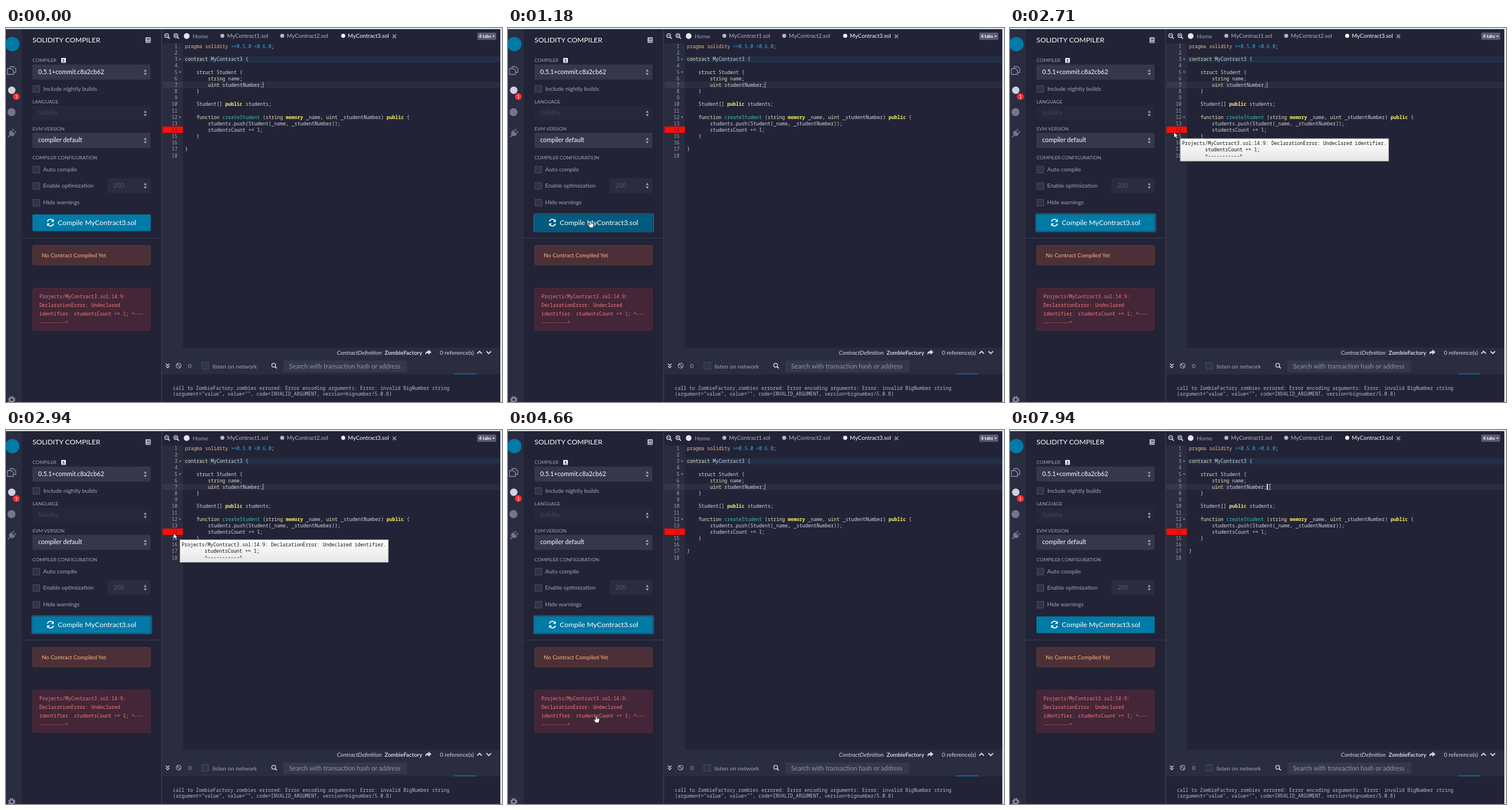
Recreate the animation shown at these times as an HTML page. Size 862x649 px, loop 8 s.

```html
<!DOCTYPE html>
<html lang="en">
<head>
<meta charset="utf-8">
<title>Solidity compiler</title>
<style>
html, body { margin: 0; width: 100%; height: 100%; overflow: hidden; background: #222336; }
svg { display: block; width: 100%; height: 100%; }
text { font-family: Lato, sans-serif; white-space: pre; }
.m { font-family: "Noto Sans Mono", "DejaVu Sans Mono", monospace; }
</style>
</head>
<body>
<svg id="stage" viewBox="0 0 862 649" xmlns="http://www.w3.org/2000/svg"></svg>
<script>
const LOOP = 8000, STEP = 78, LINE = 11.15, MONO = 8.35;
const DIM = '#a2a3b8', PALE = '#d5d6e2', WHITE = '#ffffff', FIELD = '#35384c', PANEL = '#2a2c3f', BLUE = '#007aa6';
const parts = [];
const add = s => parts.push(s);
const esc = s => s.replace(/&/g, '&amp;').replace(/</g, '&lt;');
const rect = (x, y, w, h, fill, extra = '') =>
  add(`<rect x="${x}" y="${y}" width="${w}" height="${h}" fill="${fill}" ${extra}/>`);
const disc = (x, y, r, fill) => add(`<circle cx="${x}" cy="${y}" r="${r}" fill="${fill}"/>`);
const fillPath = (d, fill, extra = '') => add(`<path d="${d}" fill="${fill}" ${extra}/>`);
const line = (d, color, w = 1.2, extra = '') =>
  add(`<path d="${d}" fill="none" stroke="${color}" stroke-width="${w}" ${extra}/>`);
const text = (x, y, s, size, fill, extra = '') =>
  add(`<text x="${x}" y="${y}" font-size="${size}" fill="${fill}" ${extra}>${esc(s)}</text>`);
const mono = (x, y, s, fill, extra = '') => text(x, y, s, MONO, fill, 'class="m" ' + extra);

function select(y, label, color, fill, x = 46) {
  rect(x, y, 251 - x, 26, fill, 'rx="1"');
  text(x + 10, y + 16, label, 10.75, color);
  fillPath(`M239.500 ${y + 12}l2.500 -4 2.500 4zM239.500 ${y + 14.500}l2.500 4 2.500 -4z`, DIM);
}
function check(x, y, label, gap = 18) {
  rect(x, y, 11.500, 11.500, '#303347', 'stroke="#4b4e64" stroke-width="1"');
  text(x + gap, y + 8.500, label, 10.1, DIM);
}
function lens(x, y, sign, color = PALE) {
  add(`<circle cx="${x - 0.8}" cy="${y - 0.8}" r="3.3" fill="none" stroke="${color}" stroke-width="1.4"/>`);
  line(`M${x + 1.6} ${y + 1.6}l3 3`, color, 1.8);
  if (sign) line(`M${x - 2.600} ${y - 0.8}h3.600` + (sign === '+' ? 'm-1.800 -1.800v3.600' : ''), color, 1);
}

function drawRail() {
  rect(0, 0, 28, 649, PANEL);
  line('M28.500 2V649', '#202132');
  disc(11, 28, 12.500, BLUE);
  line('M7 70v-3h6l4 4v6h-4M2.500 70.500h7l3.500 3.500v6.500h-10.500z', '#8a8da5', 1.3);
  disc(10, 108, 6.500, '#d0d1dc');
  disc(18, 119, 6, '#f12f2f');
  text(18, 122, '1', 8, WHITE, 'text-anchor="middle"');
  disc(9.500, 146, 7, '#72758d');
  add('<g transform="translate(10 183) rotate(45)">');
  fillPath('M-5 -3h10v2c0 4-2 5-4 5v5h-2v-5c-2 0-4-1-4-5zM-3.500 -8h2v4h-2zM1.500 -8h2v4h-2z', '#72758d');
  add('</g>');
  add('<circle cx="10" cy="645" r="5.400" fill="none" stroke="#8a8da5" stroke-width="2.200" stroke-dasharray="2.240 2"/>');
  add('<circle cx="10" cy="645" r="3.400" fill="none" stroke="#8a8da5" stroke-width="2.400"/>');
}

function drawPanel() {
  text(46, 25.200, 'SOLIDITY COMPILER', 12.3, WHITE);
  rect(242.500, 16, 9, 10, '#b9bacb', 'rx="1.200"');
  line('M245 18.500h5M245 20.500h5M244 24h7', '#222336', 0.9);
  text(46, 59.300, 'COMPILER', 8.4, DIM);
  rect(96, 52, 8, 8.500, WHITE, 'rx="1"');
  line('M100 53.500v4M98 55.500h4M97.500 58.800h5', '#222336', 1);
  select(63.500, '0.5.1+commit.c8a2cb62', WHITE, FIELD);
  check(47, 100, 'Include nightly builds');
  text(46, 130.700, 'LANGUAGE', 8.4, DIM);
  select(135, 'Solidity', '#424559', '#262839');
  text(46, 178, 'EVM VERSION', 8.4, DIM);
  select(182, 'compiler default', WHITE, FIELD);
  text(46, 228, 'COMPILER CONFIGURATION', 8.4, DIM);
  check(47, 240, 'Auto compile', 17.500);
  check(47, 268.500, 'Enable optimization', 17.500);
  select(260.500, '200', '#55586c', PANEL, 176.500);
  check(47, 297.500, 'Hide warnings', 17.500);

  rect(45, 322.500, 208, 31, 'none', 'id="ring" rx="2" stroke="#245975" stroke-width="2"');
  rect(46, 323.500, 205.500, 29, BLUE, 'id="button" rx="1"');
  line('M72 336a5.300 5.300 0 0 1 9.500 -1.800M82.500 339.500a5.300 5.300 0 0 1 -9.500 1.800', WHITE, 1.7);
  fillPath('M83 331.500v5h-5zM71.500 344v-5h5z', WHITE);
  text(90, 341.900, 'Compile MyContract3.sol', 12.2, WHITE);

  line('M28 364.500H270', '#3a3d50', 1);
  rect(46.500, 377.500, 204.500, 33.500, '#4b3137', 'rx="2" stroke="#5d3c35"');
  text(62, 397.700, 'No Contract Compiled Yet', 9.8, '#ffb37c');
  rect(46.500, 451.500, 204.500, 73.500, '#432637', 'rx="2" stroke="#512a39"');
  ['Projects/MyContract3.sol:14:9:', 'DeclarationError: Undeclared',
   'identifier. studentsCount += 1; ^---', '---------^'
  ].forEach((s, i) => mono(58, 469 + i * 15.1, s, '#f47c7c'));
  line('M270.500 2V649', '#3b3e52', 1.5);
}

function drawTabs() {
  lens(280, 14, '-');
  lens(296, 14, '+');
  disc(314, 14, 5, '#e6e7ee');
  text(324.500, 17.500, 'Home', 10.1, DIM);
  [[376, 1], [480, 2], [586, 3]].forEach(([x, n]) => {
    const c = n === 3 ? WHITE : '#b4b5c6';
    disc(x, 13.500, 3.500, c);
    text(x + 8, 17, `MyContract${n}.sol`, 9.8, c);
  });
  line('M672 11.500l6 6M678 11.500l-6 6', '#84879c', 2);
  rect(819, 8, 33, 12.500, '#5a5d76', 'rx="2"');
  text(822, 17, '4 tabs', 7.7, WHITE, 'font-weight="700"');
  fillPath('M845 13.500h4.500l-2.250 2.250z', WHITE);
}

// Token colours are picked by the letter before the bar.
const INK = { p: '#f0bd91', k: '#f1e4bd', w: '#d6d6de', b: '#2db6f0', y: '#f6ee62', g: '#3ec1b4' };
const source = [
  'p|pragma solidity ~b|>=0.5.0 <0.6.0~w|;', '', 'k|contract ~w|MyContract3 {', '',
  'k|    struct ~w|Student {', 'k|        string ~w|name;', 'k|        uint ~w|studentNumber;', 'w|    }', '',
  'w|    Student[] ~y|public ~w|students;', '',
  'k|    function ~g|createStudent ~w|(~k|string ~y|memory ~w|_name, ~k|uint ~w|_studentNumber) ~y|public ~w|{',
  'w|        students.push(Student(_name, _studentNumber));', 'w|        studentsCount += 1;',
  'w|    }', '', 'w|}', ''
];

function drawEditor() {
  rect(272, 26.500, 35.500, 528.500, PANEL);
  rect(307.500, 49, 551, 11, '#222f45');
  rect(272, 93, 35.500, 11, '#35384c');
  rect(307.500, 93, 551, 11, '#2a2c40');
  rect(272, 171, 35.500, 11, '#ff0e08');
  source.forEach((row, i) => {
    const y = 35 + i * LINE, n = i + 1;
    mono(298, y, String(n), n === 14 ? '#7c1820' : '#a4a5b5', 'text-anchor="end"');
    if ([3, 5, 12].includes(n)) fillPath(`M300.500 ${y - 4}h4l-2 2.500z`, '#9495a8');
    const spans = row.split('~').filter(Boolean).map(t =>
      `<tspan fill="${INK[t[0]]}" font-weight="${t[0] === 'y' ? 600 : 400}">${esc(t.slice(2))}</tspan>`);
    add(`<text class="m" x="311" y="${y}" font-size="${MONO}">${spans.join('')}</text>`);
  });
  rect(446.300, 93.500, 1, 10.500, '#d8d8e0', 'id="caret"');
}

function drawTerminal() {
  rect(272, 555, 587, 16, PANEL);
  rect(272, 571, 587, 30, PANEL);
  text(575, 566.500, 'ContractDefinition', 10.1, PALE, 'font-style="italic"');
  text(658, 566.500, 'ZombieFactory', 9.8, PALE, 'font-weight="700"');
  fillPath('M734 558l5.500 4.500 -5.500 4.500v-2.700c-3 0-4 .5-4.500 2.700 -1.500-4 .5-6.300 4.500-6.300z', PALE);
  text(754, 566.500, '0 reference(s)', 10, PALE);
  line('M819 565l4 -4 4 4M835 561l4 4 4 -4', PALE, 1.9);
  line('M278 582.500l3 3 3 -3M278 586.500l3 3 3 -3', PALE, 1.4);
  add(`<circle cx="300" cy="586" r="4.200" fill="none" stroke="${DIM}" stroke-width="1.300"/>`);
  line('M297 583l6 6', DIM, 1.3);
  text(316.500, 590, '0', 10.1, DIM);
  check(340.500, 580.500, '', 18);
  text(359, 591, 'listen on network', 10.1, DIM);
  lens(466, 586, '');
  rect(482, 577, 215, 20, FIELD, 'rx="1"');
  text(492, 590.500, 'Search with transaction hash or address', 11.15, '#9293a8');
  rect(779, 599.500, 38, 1.500, BLUE);
  mono(290, 628, 'call to ZombieFactory.zombies errored: Error encoding arguments: Error: invalid BigNumber string', '#b9bacb');
  mono(290, 638, '(argument="value", value="", code=INVALID_ARGUMENT, version=bignumber/5.0.8)', '#b9bacb');
}

function drawOverlay() {
  rect(0, 0, 862, 2, '#dce8ee');
  rect(859, 0, 3, 649, '#dfe5ea');
  add('<defs><linearGradient id="tipFill" x2="0" y2="1"><stop stop-color="#fff"/><stop offset="1" stop-color="#e6e6e6"/></linearGradient></defs>');
  add('<g id="tip">');
  rect(0, 0, 362, 39, 'url(#tipFill)', 'stroke="#b5b5b5" stroke-width="0.800"');
  ['Projects/MyContract3.sol:14:9: DeclarationError: Undeclared identifier.',
   '        studentsCount += 1;', '        ^-----------^'
  ].forEach((s, i) => mono(3, 11.300 + i * 11, s, '#111111'));
  add('</g>');
  add('<g id="arrow">');
  fillPath('M0 0V9.300L2.200 7.300 3.800 10.800 5.400 10 3.900 6.700H6.800z', WHITE, 'stroke="#111" stroke-width="0.600"');
  add('</g><g id="hand">');
  fillPath('M-1 .5Q0-.7 1 .5V4.200L5 5Q6.200 5.400 6 7L5.300 10.500 4.600 12.500H-.8L-2 10.500 -4 7.500Q-4.300 6-3 6.200L-1 7.800z',
    WHITE, 'stroke="#111" stroke-width="0.700"');
  line('M1.500 5v2M3.300 5.300v2', '#111', 0.5);
  add('</g><g id="beam">');
  line('M-2 -4.500h1.500l.5 .5 .5 -.5h1.500M0 -4V4M-2 4.500h1.500l.5 -.5 .5 .5h1.500', '#d2d2d8', 0.9);
  add('</g>');
}

drawRail(); drawPanel(); drawTabs(); drawEditor(); drawTerminal(); drawOverlay();
document.getElementById('stage').innerHTML = parts.join('');
const el = Object.fromEntries(['ring', 'button', 'caret', 'tip', 'arrow', 'hand', 'beam']
  .map(id => [id, document.getElementById(id)]));
const show = (node, on) => node.setAttribute('visibility', on ? 'visible' : 'hidden');
const move = (node, x, y) => node.setAttribute('transform', `translate(${x} ${y})`);

// Pointer stops: time, x, y.
const route = [
  [70, 850, 470], [400, 430, 380], [780, 143, 334], [1320, 143, 334], [1700, 296, 215], [1870, 300, 178],
  [2020, 298, 174], [2100, 291, 160], [2180, 291, 161], [2340, 302, 177], [2650, 285, 181], [2760, 285, 181],
  [2920, 293, 179], [3010, 293, 179], [3120, 175, 416], [3190, 175, 416], [3430, 84, 508], [3800, 153, 495.500],
  [4730, 153, 495.500], [5200, 327, 289], [5450, 327, 289], [6060, 465, 110], [6540, 465, 110],
  [6620, 453, 100], [6780, 453, 100], [7090, 451.500, 98.800], [8000, 451.500, 98.800]
];
function pointer(t) {
  const i = route.findIndex(p => p[0] > t);
  if (i < 1) return i ? route[route.length - 1].slice(1) : null;
  const [t0, x0, y0] = route[i - 1], [t1, x1, y1] = route[i], k = (t - t0) / (t1 - t0);
  return [x0 + (x1 - x0) * k, y0 + (y1 - y0) * k];
}
const inside = (p, x0, y0, x1, y1) => p && p[0] >= x0 && p[0] <= x1 && p[1] >= y0 && p[1] <= y1;

function render(t) {
  const p = pointer(Math.floor(t / STEP) * STEP);
  const onButton = inside(p, 46, 324, 251, 352);
  const onError = inside(p, 46, 451, 251, 525);
  const onCode = inside(p, 307.500, 26, 858, 555);
  const kind = !p ? '' : onButton || onError ? 'hand' : onCode ? 'beam' : 'arrow';
  for (const k of ['arrow', 'hand', 'beam']) {
    show(el[k], k === kind);
    if (k === kind) move(el[k], ...p);
  }
  const onMark = inside(p, 272, 171, 307, 184);
  show(el.tip, onMark);
  if (onMark) move(el.tip, p[0] + 11, p[1] + 11);

  const focused = t >= 6800;
  el.button.setAttribute('fill', onButton ? '#005b7e' : BLUE);
  show(el.ring, t >= 960 && !focused);
  el.caret.setAttribute('width', focused ? 1.8 : 1);
  el.caret.setAttribute('fill', focused ? WHITE : '#b9bac6');
  show(el.caret, !(t >= 7570 && t < 7940));
}

const start = performance.now();
function tick() {
  render((performance.now() - start) % LOOP);
  requestAnimationFrame(tick);
}
render(0);
requestAnimationFrame(tick);
</script>
</body>
</html>
```
